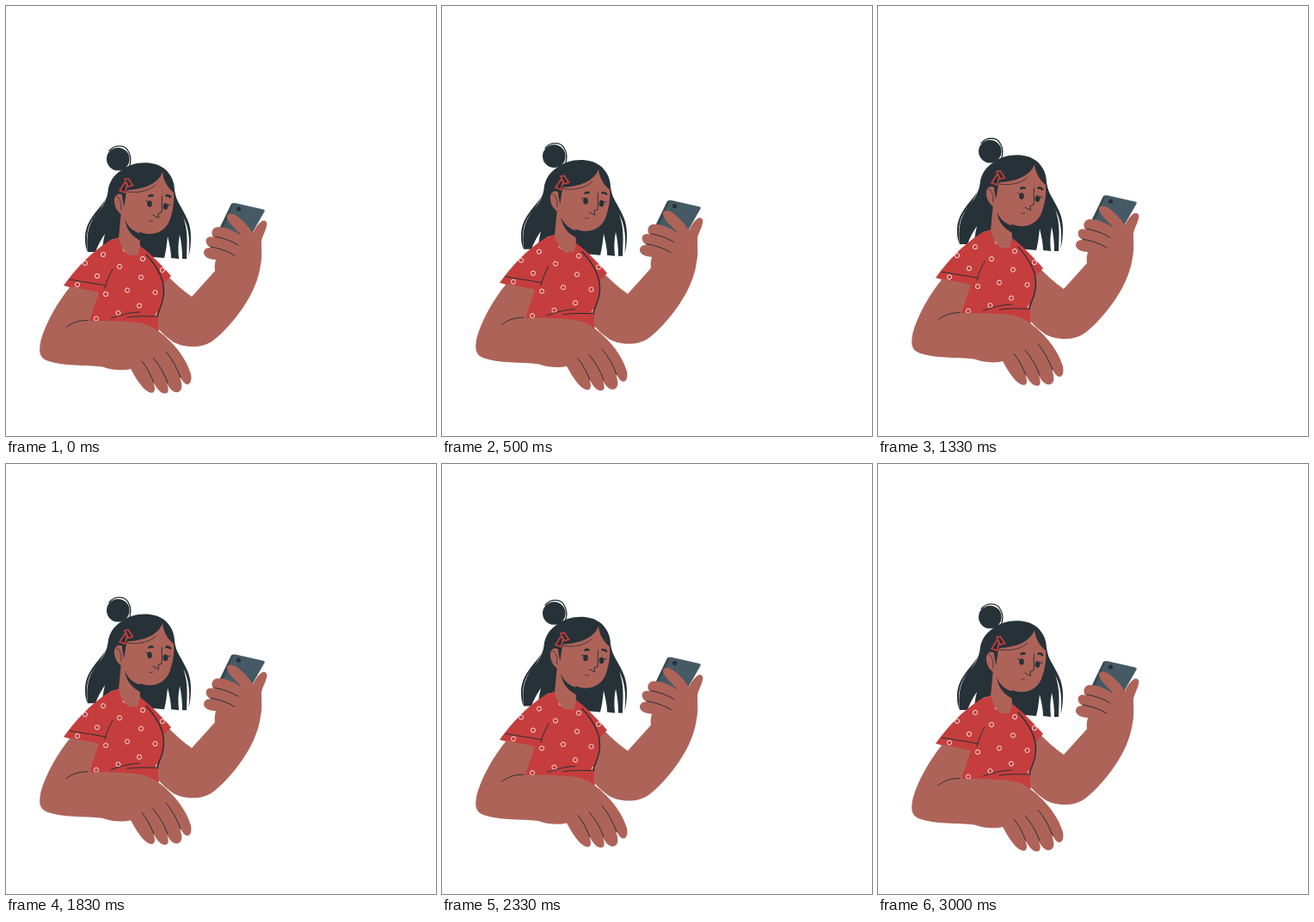
Recreate the animation shown at these times as an HTML page. Size 500x500 px, loop 3.04 s.

```html
<!DOCTYPE html>
<html>
<head>
<meta charset="utf-8">
<style>
  html, body { margin: 0; width: 100%; height: 100%; overflow: hidden; background: #fff; }
  svg { display: block; width: 100vw; height: 100vh; }
  .skin { fill: #ae6359; }
  .hair { fill: #263238; }
  .red { fill: #c63d3d; }
  .line { fill: none; stroke: #263238; stroke-linecap: round; stroke-linejoin: round; }
</style>
</head>
<body>
<svg viewBox="0 0 500 500">
  <g id="girl">
    <!-- bun and back hair -->
    <circle class="hair" cx="130.3" cy="178" r="13.3"/>
    <path class="line" d="M120 168.500C126 161 138 161 142 168.500C145.500 174 145.500 182 142.500 189" stroke-width="1.3"/>
    <path class="hair" d="M134 191C144 183 160 180 174 184C188 188 196 201 196 214C198 228 205 238 208 252C212 266 210 282 210 294L205 294C205 284 204 275 202 266C200 276 200 285 201 294L192 293C192 285 190 277 188 268C187 277 186 285 184 293L160 291L150 274L130 270L122 272C119 277 118 281 117 285L112 286C112 280 113 273 115 265C110 272 106 280 104 286L95 286C93 268 95 255 104.500 243C116 230 118 222 119 212C121 203 126 196 134 191Z"/>
    <path class="hair" d="M119 220C109 237 92 248 92 270C92 278 93 282 95 286C92 266 95 252 107 241Z"/>
    <path class="hair" d="M195 214C199 233 215 244 215 268C215 278 214 285 212.500 291C214.500 268 212 252 201 238Z"/>

    <!-- phone and raised arm -->
    <path d="M265 229L262 230L248 259L284 270L287 264Z" fill="#37474f"/>
    <path d="M266 229L299 236.500Q302 237.500 300 240L284 268L252 259L264 231Q265 229 266 229Z" fill="#455a64"/>
    <circle class="hair" cx="270.5" cy="236" r="2.6"/>
    <path class="skin" d="M186 312C196 322 206 331 216 338L243 308C242 303 243 299 244 295C236 295 229 291 230 286C231 282 234 281 238 281C232 278 231 271 235 269C237 268 239 268 241 269C237 263 241 257 246 257C257 257 266 262 274 267C266 258 256 250 257 244C259 239 267 242 271 246C277 251 282 256 287 264C290 258 294 252 298 250C303 248 304 253 303 256C302 262 298 267 297 273C297 283 298 293 296 301C293 325 278 352 256 375C242 390 233 396 219 396C208 396 201 394 195 391C188 386 182 381 175 373L178 330Z"/>
    <path class="line" d="M243 268C253 270 262 273 270 278M238 280C249 282 258 285 266 290"/>

    <!-- shirt -->
    <path class="red" d="M67 325C80 307 98 287 120 273L131 269L156 279C168 288 180 300 192 314L183 323C184 332 184 343 180 351C176 360 176 368 178 378L92 370L104 336Z"/>
    <g id="dots" fill="none" stroke="#f5dede"/>
    <path class="line" d="M74 318C88 320 102 323 116 325M124 306C120 313 117 320 115 328M122 363C133 360 142 356 155 356M141 362C153 360 165 361 177 361"/>
    <path class="line" d="M163 289C176 303 184 317 183.500 333C183 346 178 352 176 360" stroke-width="1.4"/>

    <!-- neck and face -->
    <path class="skin" d="M134 238L131 270C134 280 138 287 143 290H153L156 279L155 262Z"/>
    <path class="hair" d="M138 248C142 258 149 263 160 266L157 273C147 269 140 260 138 248Z"/>
    <path class="skin" d="M182 193C183 203 188 211 195 217C196 227 194 240 190 250C186 260 176 266 165 265C152 264 143 256 138 243C131 243 125 233 126 224C128 218 133 217 136 221L138 214C155 214 176 209 182 193Z"/>
    <path class="hair" d="M136 213H142C138 219 139 228 137 234C137 229 135 225 135 221Z"/>
    <path class="line" d="M129 222C133 223 132 227 134 230C134 233 133 235 134 237M142 216C156 218 168 214 174 208" stroke-width=".8"/>

    <!-- features -->
    <g class="line">
      <path d="M166.500 221Q168.500 219.500 170.500 220.500M186.500 220.500Q189 220 191 222" stroke-width="2.6"/>
      <path d="M162.500 226.500L166 228M187.500 231.500L191 231"/>
      <path d="M181.500 221C180.500 228 182 234 181 240L177 241.500L177.500 246.500L171 243"/>
      <path d="M166.500 249.500Q168 251.500 170.500 250" stroke-width=".8"/>
    </g>
    <ellipse class="hair" cx="167" cy="230" rx="2.8" ry="3.8"/>
    <ellipse class="hair" cx="185.500" cy="233" rx="2.8" ry="3.8"/>
    <path d="M138 205.500L141 207L138.500 217L132 214.500ZM138 201.500L142 200.500L147.500 208.500L142 210Z" fill="none" stroke="#c63d3d" stroke-width="1.7"/>

    <!-- resting arm -->
    <path class="skin" d="M75 326L108 333L97 366C125 366 150 366 165 371C185 380 208 404 215 428C217 438 212 443 207 438L202 431C205 440 206 447 200 449C195 450 191 446 187 439C190 447 189 451 184 450.500C179 450 175 444 171 437C174 444 174 451 168 449.500C160 448 151 433 145 422C138 424 124 424 112 419.500C91 417 66 419 48 412.500C37.500 408 38.500 400 40.500 389C46 369 60 344 75 326Z"/>
    <path class="line" d="M158 413C164 420 168 429 172 438M171 409C178 417 184 427 188 438M186 402C193 410 199 421 203 432M70 373.500C77 368 85 365.500 95 365.500"/>
  </g>
</svg>
<script>
  const girl = document.getElementById("girl");
  const spots = [[113, 289], [92, 299], [106, 314], [83, 324], [132, 303], [159, 294], [157, 315.5], [141, 330.5],
    [173.5, 333], [116, 335], [155, 348.5], [130.5, 357], [105, 363.5], [182, 307]];
  document.getElementById("dots").innerHTML =
    spots.map(([x, y]) => `<circle cx="${x}" cy="${y}" r="2.6"/>`).join("") +
    '<path d="M136 282.500A2.600 2.600 0 0 0 140 285M176 356.500A2.600 2.600 0 0 0 175.500 361"/>';

  // Rises 10 px and falls back linearly, stepped at 24 fps.
  const start = performance.now();
  function draw() {
    const t = (performance.now() - start) % 3040;
    const step = Math.min(72, Math.floor(t * 0.024 + 0.1));
    const y = 10 * (Math.abs(step - 36) / 36 - 1);
    girl.setAttribute("transform", `translate(0 ${y})`);
    requestAnimationFrame(draw);
  }
  draw();
</script>
</body>
</html>
```
